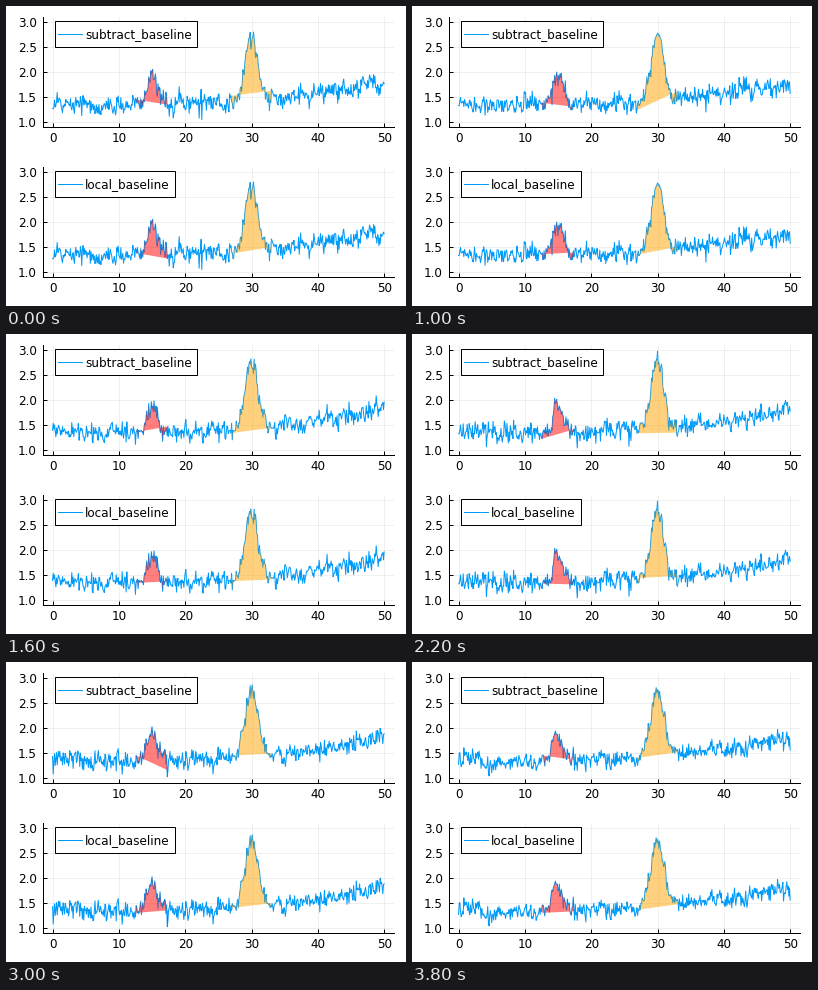
Recreate the animation shown at these times as a matplotlib script. Size 400 by 300 pixels, loop 4 s.

```python
import numpy as np
import matplotlib.pyplot as plt
from matplotlib.animation import FuncAnimation
from matplotlib.patches import Rectangle

W, H, DPI = 400, 300, 100
PX = 72 / DPI
FRAMES, STEP = 20, 200
FONT = dict(family="DejaVu Sans", size=12 * PX)
BLUE = "#009AF9"

x = np.linspace(0, 50, 501)
drift = 1.33 + 0.47 * (x / 50) ** 3 + 0.06 * np.exp(-x / 2)

# centre, width, height, half window, fill colour
PEAKS = [(15, 0.75, 0.58, 2.4, "red"), (30, 0.95, 1.32, 3.1, "orange")]
KERNEL = np.hanning(9) / np.hanning(9).sum()


def signal(i):
    """Drifting baseline, two bumps and noise, seeded by the step number."""
    rng = np.random.default_rng(40 + i)
    y = drift + rng.normal(0, 0.09, x.size)
    y += np.convolve(rng.normal(0, 0.1, x.size), KERNEL, mode="same")
    for centre, width, height, *_ in PEAKS:
        y += height * np.exp(-((x - centre) / width) ** 2 / 2)
    return y


def edge_levels(y, a, b):
    return y[a], y[b]


def local_levels(y, a, b):
    """Mean level just outside each side of the window."""
    return y[a - 10:a + 1].mean(), y[b:b + 11].mean()


fig = plt.figure(figsize=(W / DPI, H / DPI), dpi=DPI, facecolor="white")
page = fig.add_axes([0, 0, 1, 1], zorder=5)
page.set(xlim=(0, W), ylim=(H, 0))
page.axis("off")


def legend(top, width, name):
    page.add_patch(Rectangle((48.5, top), width, 26, fc="white", ec="black", lw=PX))
    page.plot([52, 76], [top + 13] * 2, color=BLUE, lw=PX)
    page.text(79, top + 17.3, name, va="baseline", **FONT)


def make_panel(bottom, name, legend_width):
    ax = fig.add_axes([36.6 / W, 1 - bottom / H, 351.5 / W, 110.4 / H])
    ax.set(xlim=(-1.5, 51.5), ylim=(0.9, 3.1),
           xticks=range(0, 51, 10), yticks=np.arange(1, 3.1, 0.5))
    ax.yaxis.set_major_formatter("{x:.1f}")
    ax.set_axisbelow(True)
    ax.grid(color="black", alpha=0.06, lw=PX)
    ax.spines[["top", "right"]].set_visible(False)
    ax.spines[["left", "bottom"]].set_linewidth(PX)
    ax.tick_params(direction="in", length=4 * PX, width=PX)
    ax.tick_params(axis="x", pad=5 * PX)
    ax.tick_params(axis="y", pad=6 * PX)
    for label in ax.get_xticklabels() + ax.get_yticklabels():
        label.set(**FONT)
    line, = ax.plot([], [], color=BLUE, lw=PX, zorder=2)
    fills = [ax.fill([0], [0], color=peak[-1], alpha=0.5, lw=0, zorder=3)[0]
             for peak in PEAKS]
    legend(bottom - 106.5, legend_width, name)
    return line, fills


panels = [(*make_panel(121, "subtract_baseline", 142), edge_levels),
          (*make_panel(271, "local_baseline", 120.5), local_levels)]


def update(i):
    y = signal(i)
    for line, fills, levels in panels:
        line.set_data(x, y)
        for fill, (centre, _, _, half, _) in zip(fills, PEAKS):
            a, b = np.searchsorted(x, [centre - half, centre + half])
            left, right = levels(y, a, b)
            fill.set_xy(np.column_stack([
                np.r_[x[a:b + 1], x[b], x[a]],
                np.r_[y[a:b + 1], right, left]]))
    return []


anim = FuncAnimation(fig, update, frames=FRAMES, interval=STEP,
                     repeat=True, repeat_delay=0, blit=False)
plt.show()
```
